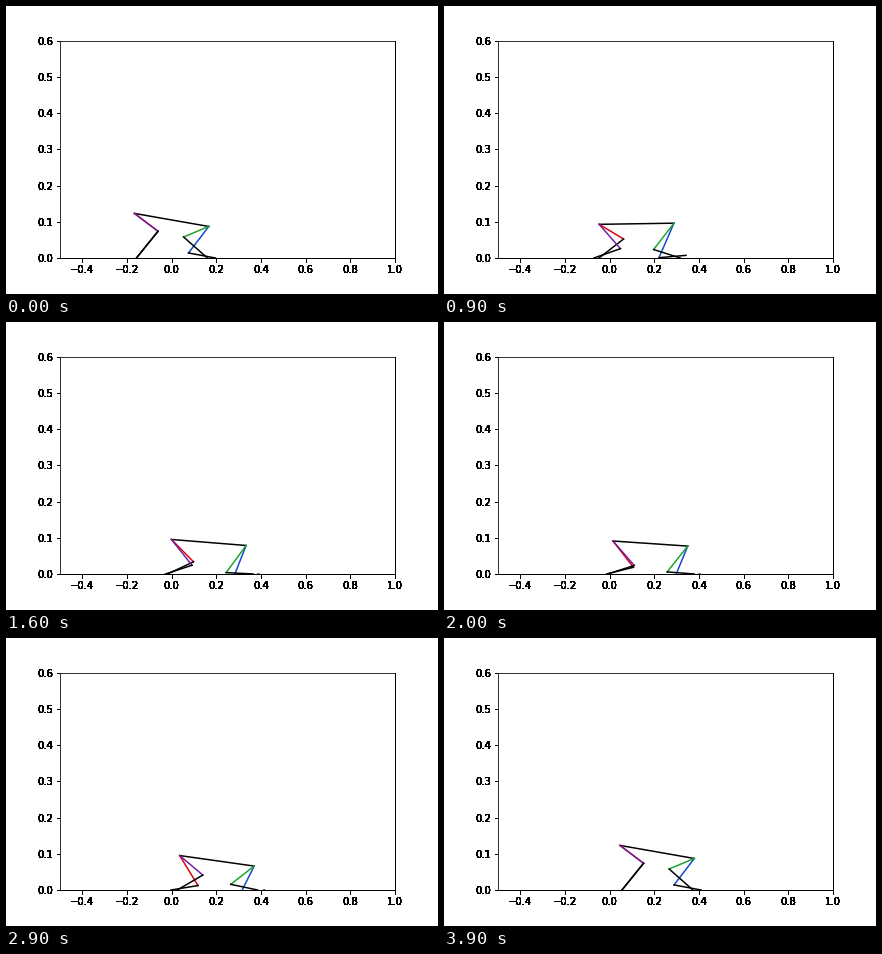
A matplotlib script for the animation above (4000 ms loop, 432x288 px).

```python
from math import exp, hypot, pi, sin, sqrt

import numpy as np
import matplotlib.pyplot as plt
from matplotlib.animation import FuncAnimation

FRAMES, INTERVAL = 40, 100
BODY, THIGH, SHIN = 0.335, 0.1165, 0.1215
START_X, TRAVEL, DECAY = -0.1665, 0.213, 3.4
LIFT = 0.011

# frame, hip height, shoulder height
KEYS = np.array([
    (0, 0.123, 0.087),
    (5, 0.094, 0.105),
    (13, 0.098, 0.0815),
    (20, 0.091, 0.077),
    (29, 0.095, 0.066),
    (35, 0.1145, 0.0705),
    (39, 0.123, 0.087),
])

# color, knee side (1 forward, -1 back), foot offset from the hip,
# sway of that offset, skew of the sway in time, start and end of the foot lift
LEGS = [
    ("#e00010", 1, 0.009, -0.049, 1.9, (0.79, 1.0)),
    ("#7020a0", 1, 0.009, -0.036, 0.7, None),
    ("#1048d0", -1, 0.363, 0.029, 0.7, (0.0, 0.3)),
    ("#1ca42c", -1, 0.327, 0.040, 0.7, None),
]


def heights(frame):
    """Hip and shoulder height on a cubic Hermite curve through the keys."""
    times, values = KEYS[:, 0], KEYS[:, 1:]
    slope = np.gradient(values, times, axis=0, edge_order=2)
    i = min(np.searchsorted(times, frame, side="right"), len(times) - 1) - 1
    h = times[i + 1] - times[i]
    s = (frame - times[i]) / h
    return ((1 + 2 * s) * (1 - s) ** 2 * values[i]
            + s * (1 - s) ** 2 * h * slope[i]
            + s * s * (3 - 2 * s) * values[i + 1]
            + s * s * (s - 1) * h * slope[i + 1])


def progress(t):
    """Fast start that dies away exponentially, from 0 to 1."""
    return (1 - exp(-DECAY * t)) / (1 - exp(-DECAY))


def lift(t, swing):
    if swing is None or not swing[0] < t < swing[1]:
        return 0
    return LIFT * sin(pi * (t - swing[0]) / (swing[1] - swing[0]))


def bend(root, foot, side):
    """Knee position for a two-part leg from root to foot."""
    dx, dy = foot[0] - root[0], foot[1] - root[1]
    d = hypot(dx, dy)
    ux, uy = dx / d, dy / d
    along = (d * d + THIGH ** 2 - SHIN ** 2) / (2 * d)
    out = side * sqrt(max(THIGH ** 2 - along ** 2, 0))
    return root[0] + along * ux - out * uy, root[1] + along * uy + out * ux


def add_axes(label):
    ax = fig.add_axes([0.125, 0.125, 0.775, 0.755], label=label)
    ax.set(xlim=(-0.5, 1.0), ylim=(0, 0.6),
           xticks=np.arange(-2, 6) / 5, yticks=np.arange(7) / 10)
    ax.xaxis.set_major_formatter("{x:.1f}")
    ax.yaxis.set_major_formatter("{x:.1f}")
    return ax


def add_line(color="black"):
    return ax.plot([], [], color=color, lw=1.5)[0]


def connect(line, a, b):
    line.set_data([a[0], b[0]], [a[1], b[1]])


fig = plt.figure(figsize=(6, 4), dpi=72, facecolor="white")
# Stacked axes give the labels heavy, solid edges; the top one holds the walker.
for n in range(14):
    ax = add_axes(f"layer{n}")

body = add_line()
limbs = [(add_line(leg[0]), add_line()) for leg in LEGS]


def update(frame):
    t = frame / (FRAMES - 1)
    hip_y, shoulder_y = heights(frame)
    hip = (START_X + TRAVEL * progress(t), hip_y)
    shoulder = (hip[0] + sqrt(BODY ** 2 - (hip_y - shoulder_y) ** 2), shoulder_y)
    connect(body, hip, shoulder)
    for (thigh, shin), (_, side, offset, sway, skew, swing) in zip(limbs, LEGS):
        root = hip if side > 0 else shoulder
        foot = (hip[0] + offset + sway * sin(pi * t ** skew), lift(t, swing))
        knee = bend(root, foot, side)
        connect(thigh, root, knee)
        connect(shin, knee, foot)
    return [body, *(line for limb in limbs for line in limb)]


anim = FuncAnimation(fig, update, frames=FRAMES, interval=INTERVAL,
                     repeat=True, repeat_delay=0, blit=False)
plt.show()
```
